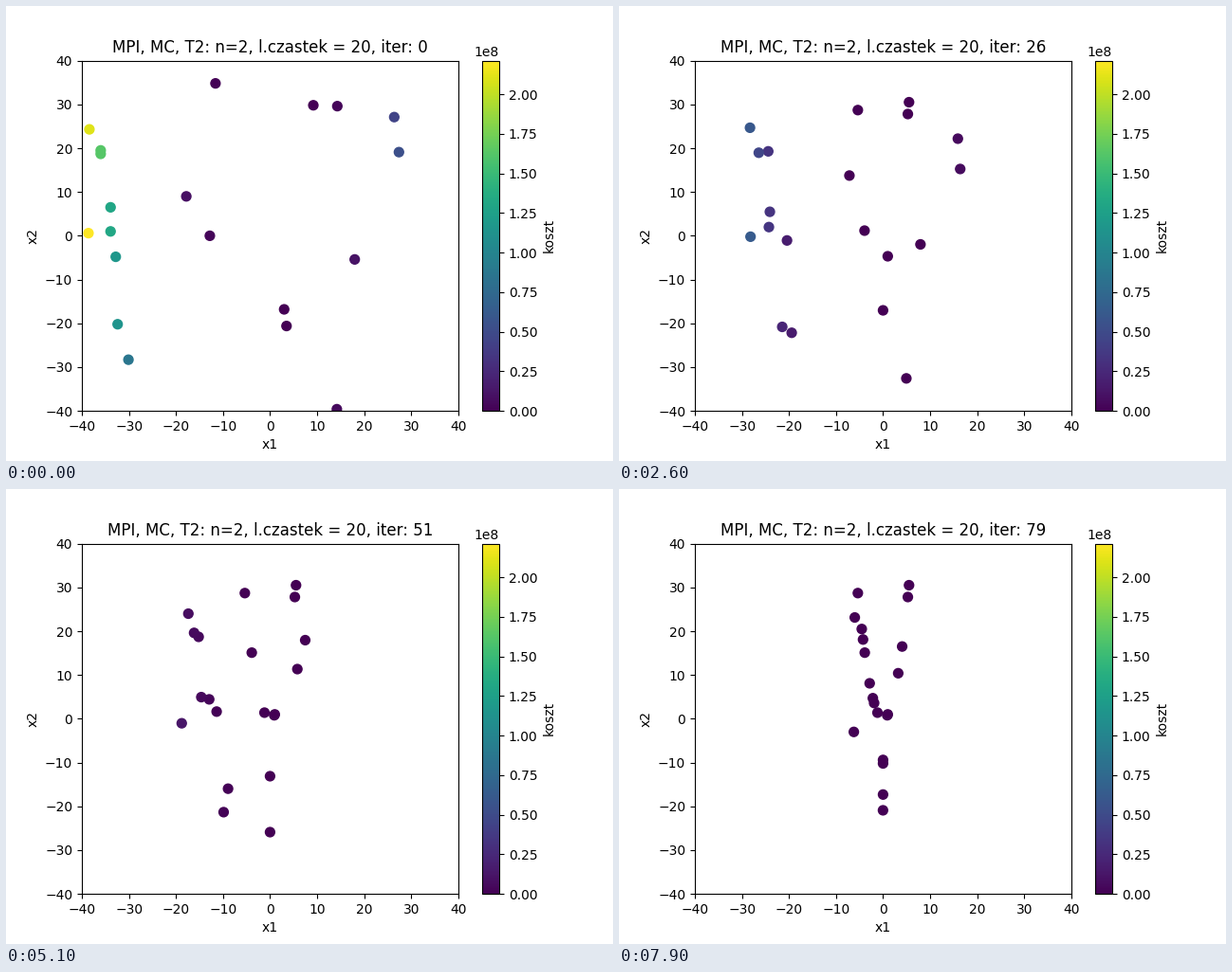
These frames come from a looping animation (640 px wide and 480 px high, 8000 ms). A matplotlib script:

```python
import numpy as np
import matplotlib.pyplot as plt
from matplotlib.animation import FuncAnimation

FRAMES, INTERVAL = 80, 100
PACE = 0.41  # mean change of x1 per iteration
JITTER = 0.15

# Each particle: starting x1 and x2, then the x2 where it settles.
PARTICLES = [
    (-38.4, 24.3, 23.1), (-36.0, 19.5, 18.1), (-36.0, 18.7, 20.5), (-33.9, 6.5, 3.6),
    (-33.9, 1.0, 8.1), (-38.6, 0.6, -3.0), (-32.8, -4.8, 4.7), (-32.4, -20.2, -20.9),
    (-30.1, -28.3, -10.2), (-17.8, 9.0, 15.1), (-12.8, 0.0, 1.4), (-11.6, 34.8, 28.7),
    (9.2, 29.8, 27.8), (14.3, 29.6, 30.5), (26.4, 27.1, 16.5), (27.4, 19.1, 10.4),
    (18.0, -5.4, 0.8), (3.0, -16.8, 1.0), (3.5, -20.6, -9.4), (14.2, -39.6, -17.3),
]


def cost(x, y):
    return 100 * (y - x**2) ** 2 + (1 - x) ** 2


def simulate():
    """Walk every particle to the valley x2 = x1**2, or to x1 = 0 below it."""
    rng = np.random.default_rng(20)
    x0, y0, y1 = np.array(PARTICLES).T[..., None]
    x1 = np.sign(x0) * np.sqrt(np.maximum(y1, 0))

    shape = len(x0), FRAMES
    steps = rng.random(shape)
    steps[:, 0] = 0
    total = PACE * (FRAMES - 1)
    travel = total * np.cumsum(steps, axis=1) / steps.sum(axis=1, keepdims=True)

    # Below the valley x2 keeps creeping for the whole run.
    dx, dy = abs(x1 - x0), abs(y1 - y0)
    reach = np.where(y1 > 0, np.maximum(dx, dy), total)
    px, py = np.minimum(travel / dx, 1), np.minimum(travel / reach, 1)

    wander = np.cumsum(JITTER * rng.normal(size=shape) * (steps > 0), axis=1)
    x = x0 + px * (x1 - x0)
    y = y0 + py * (y1 - y0) + wander * (1 - py)
    return np.stack([x, y], axis=-1)


swarm = simulate()
fig, ax = plt.subplots(figsize=(6.4, 4.8), dpi=100)
dots = ax.scatter([], [], s=50, c=[], cmap="viridis", vmin=0, vmax=2.213e8)
fig.colorbar(dots, ax=ax, label="koszt")
ax.set(xlim=(-40, 40), ylim=(-40, 40), xlabel="x1", ylabel="x2")
title = ax.set_title("")


def update(i):
    xy = swarm[:, i]
    dots.set_offsets(xy)
    dots.set_array(cost(*xy.T))
    title.set_text(f"MPI, MC, T2: n=2, l.czastek = 20, iter: {i}")
    return dots, title


anim = FuncAnimation(fig, update, frames=FRAMES, interval=INTERVAL, repeat=True)
plt.show()
```
